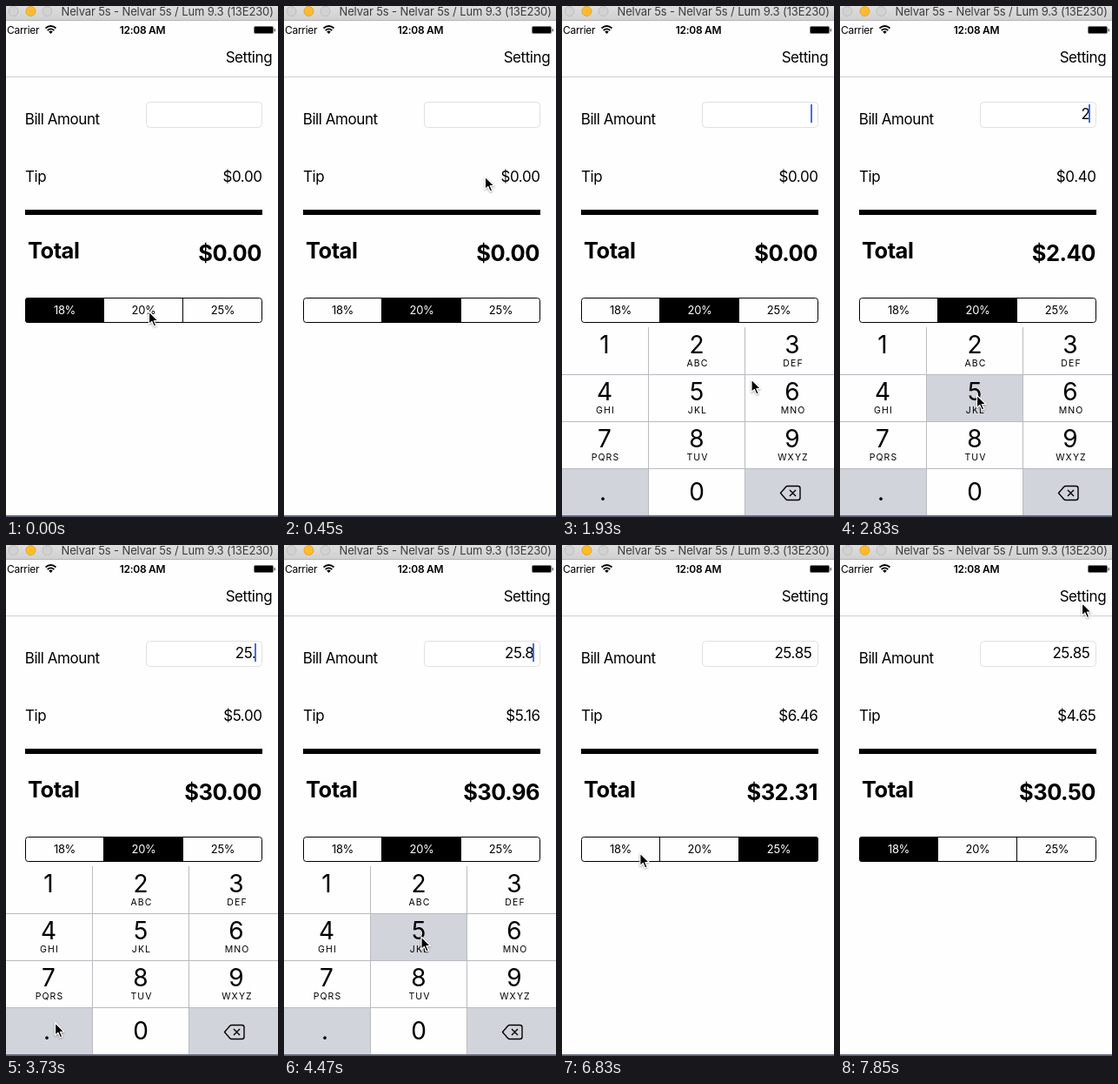
An HTML page for the animation above (8 s loop, 313 px wide and 587 px high).

```html
<!DOCTYPE html>
<html lang="en">
<head>
<meta charset="utf-8">
<title>Tip calculator</title>
<style>
  html, body { margin: 0; width: 100%; height: 100%; overflow: hidden; background: #fefefe; }
  svg { display: block; }
  text { font: 17px Inter, "Open Sans", sans-serif; letter-spacing: -.025em; }
  .end { text-anchor: end; }
  .mid { text-anchor: middle; }
  .title { font-size: 13px; letter-spacing: -.01em; fill: #3c3c3c; }
  .status { font-size: 12px; }
  .bold { font-weight: 600; }
  .total { font-size: 25.5px; font-weight: 700; letter-spacing: -.02em; }
  .segment { font-size: 13px; }
  .digit { font-size: 28px; letter-spacing: 0; }
  .letters { font-size: 10.5px; letter-spacing: 1.1px; }
</style>
</head>
<body>
<svg width="313" height="587" viewBox="0 0 313 587">
  <defs>
    <linearGradient id="chrome" x2="0" y2="1">
      <stop stop-color="#dedede"/><stop offset="1" stop-color="#d0d0d0"/>
    </linearGradient>
    <clipPath id="control"><rect x="22" y="335" width="273" height="29" rx="3.5"/></clipPath>
  </defs>
  <rect width="313" height="587" fill="#fefefe"/>

  <rect width="313" height="16" fill="url(#chrome)"/>
  <rect y="16" width="313" height="1" fill="#b4b4b4"/>
  <g fill="#d2d2d2" stroke="#bdbdbd">
    <circle cx="8.5" cy="6" r="5.5"/>
    <circle cx="28.5" cy="6" r="5.5" fill="#fdbc2f" stroke="#e3a52a"/>
    <circle cx="47.5" cy="6" r="5.5"/>
  </g>
  <text class="title" x="63.5" y="11">Nelvar 5s - Nelvar 5s / Lum 9.3 (13E230)</text>

  <text class="status" x="1" y="31.5">Carrier</text>
  <g fill="none" stroke="#000" stroke-width="1.8">
    <path d="M45.5 25.5Q51.5 20.5 57.5 25.5M47.7 28Q51.5 24.7 55.3 28"/>
    <path d="M51.5 32l-2.3-2.5q2.3-1.8 4.6 0z" fill="#000" stroke="none"/>
  </g>
  <text class="status bold mid" x="157" y="31.5">12:08 AM</text>
  <rect x="285.5" y="23.500" width="22" height="8" rx="1.500" stroke="#777"/>
  <rect x="308.5" y="26" width="1.4" height="3.4" rx=".7" fill="#555"/>

  <text class="end" x="306.2" y="65">Setting</text>
  <rect y="81" width="313" height="1" fill="#cfcfcf"/>

  <text x="21.700" y="136">Bill Amount</text>
  <rect x="161.5" y="110.5" width="133" height="29" rx="4" fill="#fff" stroke="#e0e0e0"/>
  <text id="bill" class="end" x="287.4" y="130"></text>
  <rect id="caret" x="286" y="113" width="2" height="21" fill="#426bf2"/>
  <text x="22" y="202">Tip</text>
  <text id="tip" class="end" x="294.5" y="202"></text>
  <rect x="22" y="234" width="273" height="6"/>
  <text class="total" x="25" y="290">Total</text>
  <text id="total" class="total end" x="294" y="292.5"></text>

  <g clip-path="url(#control)">
    <rect id="selection" y="335" width="91" height="29"/>
    <path d="M112.5 335v29M203.5 335v29" stroke="#000"/>
  </g>
  <rect x="22.5" y="335.5" width="272" height="28" rx="3" fill="none" stroke="#000"/>
  <g id="segments"></g>

  <g id="keyboard"></g>
  <rect y="585" width="313" height="2" fill="#62667a"/>

  <path id="cursor" d="M0 0V14.5L3.4 11.4L5.8 17L8.3 16L5.9 10.5H10.5Z"
        fill="#000" stroke="#fff" stroke-width="1.2" stroke-linejoin="round"
        style="filter:drop-shadow(0 1px 1px #0005)"/>
</svg>
<script>
const LOOP = 8000;
const FOCUS = 1380, BLUR = 5200, SLIDE = 600, KEYBOARD_HEIGHT = 217;
const KEYS = ['1', '2', '3', '4', '5', '6', '7', '8', '9', '.', '0', '⌫'];
const LETTERS = ['', 'ABC', 'DEF', 'GHI', 'JKL', 'MNO', 'PQRS', 'TUV', 'WXYZ'];
const RATES = [18, 20, 25];

// key, time pressed, time released
const presses = [
  ['2', 2370, 2510], ['5', 2800, 2960], ['.', 3550, 3700],
  ['8', 4020, 4160], ['5', 4440, 4600]
];
// time, selected segment
const selections = [[0, 0], [200, 1], [6150, 2], [7100, 0]];
// time, x, y of the pointer tip
const path = [
  [0, 164.5, 351], [200, 164.5, 351], [570, 253, 146], [1050, 250, 146],
  [1300, 246, 126], [1500, 246, 126], [1930, 218, 429], [2280, 157, 400],
  [2520, 157, 400], [2780, 157.5, 447], [2980, 157.5, 447], [3280, 73, 545],
  [3450, 56, 549], [3720, 56, 549], [3980, 157, 498], [4180, 157, 498],
  [4400, 158, 450], [4640, 158, 450], [5100, 208, 300], [5350, 208, 300],
  [5850, 239.5, 342], [6250, 239.5, 343], [6800, 90, 354], [7150, 84, 355],
  [7750, 278.5, 66.5], [8000, 278.5, 66.5]
];

const $ = id => document.getElementById(id);
const clamp = v => Math.max(0, Math.min(1, v));
const easeOut = u => 1 - (1 - clamp(u)) ** 3;
const smooth = u => u * u * (3 - 2 * u);
const money = v => '$' + v.toFixed(2);

function add(parent, tag, attributes, content = '') {
  const node = document.createElementNS('http://www.w3.org/2000/svg', tag);
  for (const name in attributes) node.setAttribute(name, attributes[name]);
  node.textContent = content;
  return parent.appendChild(node);
}

const segments = RATES.map((rate, i) =>
  add($('segments'), 'text', { class: 'segment mid', x: 67.5 + 91 * i, y: 354 }, rate + '%'));

const edges = [0, 100, 211, 313], centers = [49, 155, 265];
const keyRects = KEYS.map((key, i) => {
  const col = i % 3, y = 369 + 54 * Math.floor(i / 3), x = centers[col];
  const rect = add($('keyboard'), 'rect', { x: edges[col], y, width: edges[col + 1] - edges[col], height: 54 });
  if (key === '⌫') {
    add($('keyboard'), 'path', {
      d: 'M251.5 559.5l6-7q1-1 2-1h12q2.5 0 2.5 2.5v11q0 2.5-2.5 2.5h-12q-1 0-2-1zM262 556l7 7m0-7l-7 7',
      fill: 'none', stroke: '#000', 'stroke-width': 1.4, 'stroke-linejoin': 'round'
    });
  } else {
    const baseline = i < 9 ? y + 30 : y + 37;
    add($('keyboard'), 'text', { class: 'digit mid', x: key === '.' ? 47 : x, y: baseline }, key);
    add($('keyboard'), 'text', { class: 'letters mid', x: x + 1, y: y + 45 }, LETTERS[i]);
  }
  return rect;
});
add($('keyboard'), 'path', {
  d: 'M0 423.5H313M0 477.5H313M0 531.5H313M99.5 369V585M210.5 369V585', stroke: '#b9bbc0'
});

function pointerAt(t) {
  const i = path.findIndex(point => point[0] > t);
  const [t0, x0, y0] = path[i - 1], [t1, x1, y1] = path[i];
  const u = smooth((t - t0) / (t1 - t0));
  return [x0 + (x1 - x0) * u, y0 + (y1 - y0) * u];
}

function draw(t) {
  const typed = presses.filter(press => press[2] <= t);
  const held = presses.find(press => press[1] <= t && t < press[2]);
  const selected = selections.filter(choice => choice[0] <= t).pop()[1];

  const bill = typed.map(press => press[0]).join('');
  const amount = parseFloat(bill) || 0, tip = amount * RATES[selected] / 100;
  $('bill').textContent = bill;
  $('tip').textContent = money(tip);
  $('total').textContent = money(amount + tip);

  const lastInput = typed.length ? typed[typed.length - 1][2] : FOCUS;
  const caretOn = t >= FOCUS && t < BLUR && (t - lastInput) % 1060 < 600;
  $('caret').setAttribute('visibility', caretOn ? 'visible' : 'hidden');

  $('selection').setAttribute('x', 22 + 91 * selected);
  segments.forEach((label, i) => label.setAttribute('fill', i === selected ? '#fff' : '#000'));

  KEYS.forEach((key, i) => {
    const dark = (key === '.' || key === '⌫') !== Boolean(held && held[0] === key);
    keyRects[i].setAttribute('fill', dark ? '#d1d4db' : '#fefefe');
  });
  const raised = easeOut((t - FOCUS) / SLIDE) - easeOut((t - BLUR) / SLIDE);
  $('keyboard').setAttribute('transform', `translate(0 ${Math.round(KEYBOARD_HEIGHT * (1 - raised))})`);

  $('cursor').setAttribute('transform', `translate(${pointerAt(t)})`);
}

const start = performance.now();
function tick() {
  draw((performance.now() - start) % LOOP);
  requestAnimationFrame(tick);
}
tick();
</script>
</body>
</html>
```
